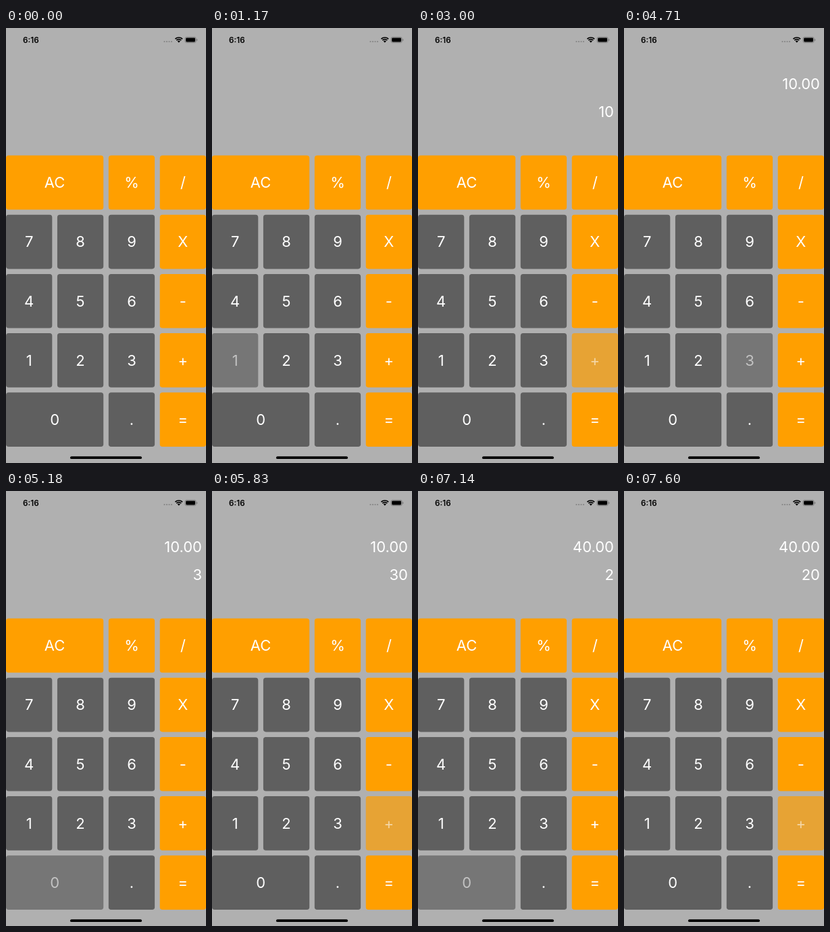
Recreate the animation shown at these times as an HTML page with a canvas. Size 296x640 px, loop 8000 ms.

```html
<!DOCTYPE html>
<html lang="en">
<head>
<meta charset="utf-8">
<title>Calculator</title>
<style>
html, body { margin: 0; width: 100%; height: 100%; overflow: hidden; background: #b0b0b0; }
canvas { display: block; width: 296px; height: 640px; }
</style>
</head>
<body>
<canvas id="stage"></canvas>
<script>
const W = 296, H = 640, LOOP = 8000;
const BG = '#b0b0b0', ORANGE = '#ff9f00', DARK = '#5f5f5f';
const FONT = 'Inter, "Liberation Sans", sans-serif';
const GAP = 7.6, KEY_W = (W - 3 * GAP) / 4, KEY_H = 79.7, TOP = 187.5, PITCH = 87.2;

const canvas = document.getElementById('stage');
const ctx = canvas.getContext('2d');
const dpr = window.devicePixelRatio || 1;
canvas.width = W * dpr;
canvas.height = H * dpr;
ctx.scale(dpr, dpr);

// Each state: start time, pressed key, stored total, current entry
const STATES = [
  [0, '', '', ''],
  [1170, '1', '', ''],
  [1600, '0', '', '1'],
  [1730, '', '', '10'],
  [3000, '+', '', '10'],
  [4710, '3', '10.00', ''],
  [5180, '0', '10.00', '3'],
  [5830, '+', '10.00', '30'],
  [6790, '2', '40.00', ''],
  [7140, '0', '40.00', '2'],
  [7600, '+', '40.00', '20']
];

const ROWS = [['AC', '%', '/'], ['7', '8', '9', 'X'], ['4', '5', '6', '-'], ['1', '2', '3', '+'], ['0', '.', '=']];
const KEYS = ROWS.flatMap((row, r) => {
  let col = 0;
  return row.map((label, i) => {
    const span = row.length === 3 && i === 0 ? 2 : 1;
    const key = {
      label,
      x: col * (KEY_W + GAP),
      y: TOP + r * PITCH,
      w: span * KEY_W + (span - 1) * GAP,
      fill: r === 0 || i === row.length - 1 ? ORANGE : DARK
    };
    col += span;
    return key;
  });
});

function box(x, y, w, h, r, fill) {
  ctx.fillStyle = fill;
  ctx.beginPath();
  ctx.roundRect(x, y, w, h, r);
  ctx.fill();
}

function text(str, x, y, align, size = 22, weight = 400, fill = '#fff') {
  ctx.font = `${weight} ${size}px ${FONT}`;
  ctx.textAlign = align;
  ctx.fillStyle = fill;
  ctx.fillText(str, x, y);
}

function drawWifi(cx, cy) {
  const a = Math.PI / 4;
  ctx.strokeStyle = ctx.fillStyle = '#000';
  ctx.lineWidth = 1.7;
  for (const r of [7.6, 4.9]) {
    ctx.beginPath();
    ctx.arc(cx, cy, r, -Math.PI / 2 - a, -Math.PI / 2 + a);
    ctx.stroke();
  }
  ctx.beginPath();
  ctx.moveTo(cx, cy);
  ctx.arc(cx, cy, 3, -Math.PI / 2 - a, -Math.PI / 2 + a);
  ctx.fill();
}

function drawStatus() {
  text('6:16', 25, 22, 'left', 11.7, 600, '#000');
  for (let i = 0; i < 4; i++) box(233.4 + i * 3.5, 18.9, 2.2, 2.2, 1.1, '#858585');
  drawWifi(255.8, 21.6);
  ctx.strokeStyle = '#777';
  ctx.lineWidth = 0.8;
  ctx.beginPath();
  ctx.roundRect(264.9, 13.4, 16.4, 8.2, 2.4);
  ctx.stroke();
  box(266.1, 14.6, 14, 5.8, 1.4, '#000');
  box(282.2, 16.1, 1, 2.8, 0.5, '#777');
}

function drawKey({ label, x, y, w, fill }, pressed) {
  ctx.globalAlpha = pressed ? 0.7 : 1;
  box(x, y, w, KEY_H, 3.8, fill);
  text(label, x + w / 2, y + KEY_H / 2 + 7.8, 'center', 22, 400, pressed ? '#ffffffcc' : '#fff');
  ctx.globalAlpha = 1;
}

function draw(now) {
  const t = now % LOOP;
  const [, pressed, total, entry] = STATES.findLast(s => s[0] <= t);
  ctx.fillStyle = BG;
  ctx.fillRect(0, 0, W, H);
  drawStatus();
  text(total, 290, 89.7, 'right');
  text(entry, 290, 131, 'right');
  for (const key of KEYS) drawKey(key, key.label === pressed);
  box(95, 630.3, 106, 3.8, 1.9, '#000');
}

const start = performance.now();
function tick() {
  draw(performance.now() - start);
  requestAnimationFrame(tick);
}
tick();
</script>
</body>
</html>
```
